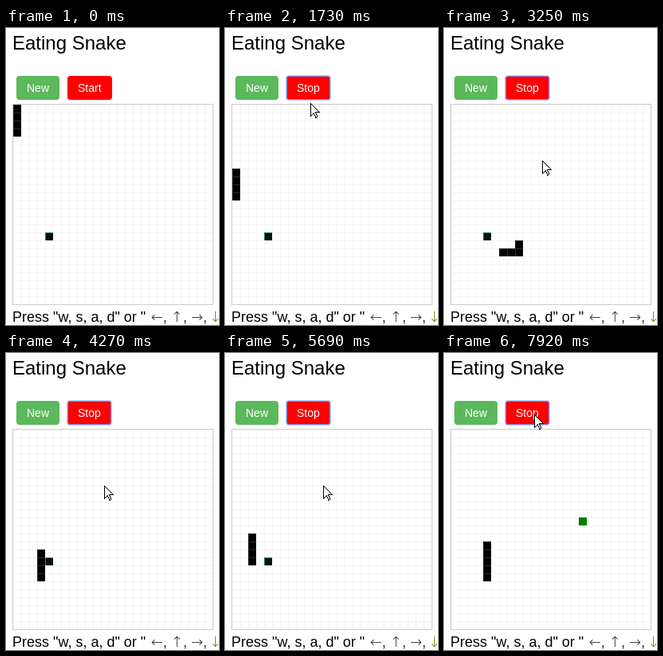
An HTML page that plays this animation: 267x372 px, repeating every 8000 ms.

```html
<!DOCTYPE html>
<html lang="en">
<head>
<meta charset="utf-8">
<title>Eating Snake</title>
<style>
  html, body { margin: 0; width: 100%; height: 100%; overflow: hidden; background: #fff; }
  svg { display: block; width: 267px; height: 372px; }
  text { font-family: "Liberation Sans", Arial, sans-serif; fill: #000; white-space: pre; }
  .title { font-size: 24px; }
  .label { font-size: 14px; fill: #fff; }
  .hint { font-size: 18px; }
  .keys { fill: #222b30; }
  .arrow { font-family: "DejaVu Sans", sans-serif; font-weight: 200; }
</style>
</head>
<body>
<svg viewBox="0 0 267 372">
  <defs>
    <pattern id="grid" x="9" y="96" width="10" height="10" patternUnits="userSpaceOnUse">
      <path d="M0 .5H10M.5 0V10" stroke="#f4f4f4"/>
    </pattern>
  </defs>
  <text class="title" x="8" y="27">Eating Snake</text>

  <rect x="13" y="60" width="54" height="30" rx="4" fill="#5cb85c"/>
  <text class="label" x="26" y="80">New</text>
  <rect id="button" x="77" y="60" height="30" rx="4" fill="#f00"/>
  <g id="ring" fill="none">
    <rect id="glow" x="76.5" y="59.5" height="31" rx="3" stroke="#4d90fe" stroke-opacity=".4"/>
    <rect id="line" x="77.5" y="60.5" height="29" rx="2.5" stroke="#7d8ce8"/>
  </g>
  <text id="label" class="label" x="90" y="80">Start</text>

  <rect x="9" y="96" width="250" height="250" fill="url(#grid)"/>
  <rect x="8.5" y="95.5" width="251" height="251" fill="none" stroke="#ccc"/>
  <g id="cells"></g>

  <text class="hint" x="8" y="368">Press "w, s, a, d" or " <tspan class="keys" dx="1.5"><tspan class="arrow">←</tspan>, <tspan class="arrow">↑</tspan>, <tspan class="arrow">→</tspan>, <tspan class="arrow" dx="-2" fill="#7a7400">↓</tspan></tspan></text>

  <path id="cursor" d="M.5 .5V16.5L4.5 12.5 7 18.5 9 17.8 6.5 11.5H11.5Z" fill="#fff" stroke="#000" shape-rendering="crispEdges"/>
</svg>
<script>
const LOOP = 8000, ENTER = 70, FOCUS = 850;
const START = 976, STEP = 98.8; // first snake move and time per move
const FOOD = [4, 16], NEXT_FOOD = [16, 11], LENGTH = 4;
const ROUTE = "D15 R8 U3 L5 D4 R3 U2 L4 U4 R7 D6 L5 U5";
const DIRS = { U: [0, -1], D: [0, 1], L: [-1, 0], R: [1, 0] };

// Each glide eases the pointer to a new place.
const GLIDES = [
  { from: ENTER, to: 700, x: 108, y: 75 },
  { from: 1180, to: 2090, x: 107, y: 98 },
  { from: 2160, to: 2930, x: 123, y: 166 },
  { from: 6010, to: 6790, x: 113, y: 77 }
];

const $ = id => document.getElementById(id);
const show = (id, on) => $(id).setAttribute("visibility", on ? "visible" : "hidden");

// The snake begins upright in the first column, then follows the route.
const trail = Array.from({ length: LENGTH }, (_, row) => [0, row]);
for (const leg of ROUTE.split(" ")) {
  const [dx, dy] = DIRS[leg[0]];
  for (let n = +leg.slice(1); n > 0; n--) {
    const [x, y] = trail[trail.length - 1];
    trail.push([x + dx, y + dy]);
  }
}
const bite = trail.findIndex(([x, y]) => x === FOOD[0] && y === FOOD[1]);

function cell([col, row], fill, edge) {
  const x = 9 + col * 10, y = 96 + row * 10;
  return `<rect x="${x}" y="${y}" width="10" height="10" fill="${fill}"/>` +
    `<path d="M${x} ${y + .5}h10M${x + .5} ${y}v10" stroke="${edge}"/>`;
}

let drawn = -1;
function drawBoard(t) {
  const moves = Math.max(0, Math.floor((t - START) / STEP) + 1);
  if (moves === drawn) return;
  drawn = moves;
  const end = Math.min(moves + LENGTH, trail.length);
  const eaten = end > bite;
  const food = eaten ? cell(NEXT_FOOD, "#008000", "#0a6e0a") : cell(FOOD, "#03140d", "#2f8a60");
  const body = trail.slice(end - LENGTH - eaten, end);
  $("cells").innerHTML = food + body.map(c => cell(c, "#000", "#2a2d2c")).join("");
}

function pointerAt(t) {
  let x = 191, y = 347;
  for (const g of GLIDES) {
    const k = Math.min(1, Math.max(0, (t - g.from) / (g.to - g.from)));
    const eased = Math.sin(k * Math.PI / 2);
    x += (g.x - x) * eased;
    y += (g.y - y) * eased;
  }
  return [Math.round(x), Math.round(y)];
}

function draw(t) {
  drawBoard(t);
  const running = t >= START, width = running ? 55 : 56;
  $("label").textContent = running ? "Stop" : "Start";
  $("button").setAttribute("width", width);
  $("glow").setAttribute("width", width + 1);
  $("line").setAttribute("width", width - 1);
  show("ring", t >= FOCUS);
  show("cursor", t >= ENTER);
  $("cursor").setAttribute("transform", `translate(${pointerAt(t)})`);
}

const begin = performance.now();
function tick() {
  draw((performance.now() - begin) % LOOP);
  requestAnimationFrame(tick);
}
tick();
</script>
</body>
</html>
```
